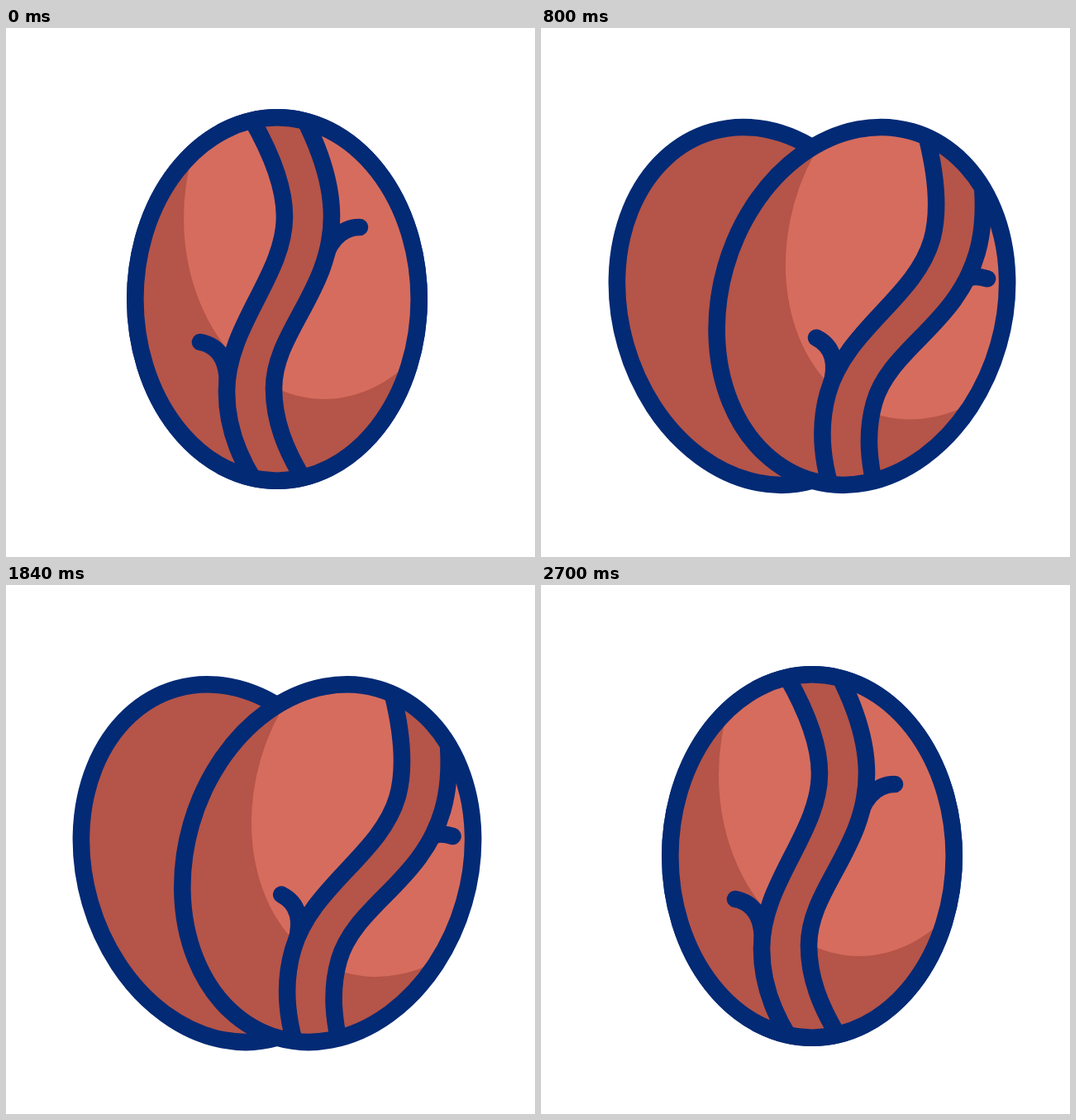
An HTML page that plays this animation: 640 px wide and 640 px high, repeating every 3.2 s.

```html
<!DOCTYPE html>
<html lang="en">
<head>
<meta charset="utf-8">
<title>Coffee bean</title>
<style>
html, body { margin: 0; width: 100%; height: 100%; overflow: hidden; background: #fff; }
svg { display: block; width: 100vw; height: 100vh; }
.line { fill: none; stroke: #032a75; stroke-width: 20.6; }
.glow { fill: none; stroke: #ffcc50; stroke-width: 22; }
.cap { stroke-linecap: round; }
.dark { fill: #b55448; }
.light { fill: #d66c5d; }
</style>
</head>
<body>
<svg viewBox="0 0 640 640">
  <defs>
    <clipPath id="shell"><ellipse cx="328" cy="328" rx="171.7" ry="219.7"/></clipPath>
  </defs>
  <g id="back">
    <ellipse class="dark" cx="328" cy="328" rx="171.7" ry="219.7"/>
    <ellipse class="line" cx="328" cy="328" rx="171.7" ry="219.7"/>
  </g>
  <g id="front">
    <g clip-path="url(#shell)">
      <ellipse class="dark" cx="328" cy="328" rx="171.7" ry="219.7"/>
      <ellipse class="light" cx="385" cy="230" rx="170" ry="219"/>
      <g id="vein">
        <path id="twigL" class="line cap"/>
        <path id="twigR" class="line cap"/>
        <path id="twigLGlow" class="glow cap" pathLength="1"/>
        <path id="twigRGlow" class="glow cap" pathLength="1"/>
        <path id="band" class="dark"/>
        <path id="stemL" class="line"/>
        <path id="stemR" class="line"/>
        <path id="stemLGlow" class="glow" pathLength="1"/>
        <path id="stemRGlow" class="glow" pathLength="1"/>
      </g>
    </g>
    <ellipse class="line" cx="328" cy="328" rx="171.7" ry="219.7"/>
  </g>
</svg>
<script>
const LOOP = 3200, OPEN = 18, REST = 14, FAR = 61, NEAR = -22;
const el = {};
document.querySelectorAll('svg [id]').forEach(n => { el[n.id] = n; });

// Cubic chains, bottom to top
const left = [[300, 547], [280, 515], [267, 480], [267, 440], [267, 360],
  [337, 300], [337, 228], [337, 190], [320, 150], [297, 110]];
const right = [[360, 546], [338, 510], [324, 475], [324, 436], [324, 368],
  [394, 318], [394, 228], [394, 178], [372, 128], [346, 82]];

const chain = pts => `${pts[0]} C${pts.slice(1).join(' ')}`;
const clamp = x => Math.min(1, Math.max(0, x));
const mix = (a, b, k) => a + (b - a) * k;
const smooth = x => x * x * (3 - 2 * x);
const ease = (t, from, to) => smooth(clamp((t - from) / (to - from)));

// Late, fast swing: cubic-bezier(.95, 0, .73, 1)
function swing(x) {
  x = clamp(x);
  let lo = 0, hi = 1;
  for (let i = 0; i < 30; i++) {
    const s = (lo + hi) / 2, r = 1 - s;
    if (3 * r * r * s * 0.95 + 3 * r * s * s * 0.73 + s * s * s < x) lo = s; else hi = s;
  }
  return smooth(lo);
}

function setPath(id, d) {
  el[id].setAttribute('d', d);
  if (el[id + 'Glow']) el[id + 'Glow'].setAttribute('d', d);
}

function trim(id, t, grow, leaveFrom, leaveTo) {
  const a = ease(t, leaveFrom, leaveTo), b = ease(t, grow, 1333);
  const node = el[id + 'Glow'];
  node.style.display = b - a > 0.001 ? '' : 'none';
  node.setAttribute('stroke-dasharray', `${b - a} 2`);
  node.setAttribute('stroke-dashoffset', -a);
}

function tilt(t) {
  if (t < 660) return OPEN * swing(t / 660);
  if (t < 1333) return mix(OPEN, REST, ease(t, 660, 935));
  if (t < 1998) return mix(REST, OPEN, ease(t, 1667, 1998));
  return OPEN * swing((2663 - t) / 665);
}

function slide(t) {
  if (t < 650) return FAR * swing(t / 650);
  if (t < 1320) return mix(FAR, NEAR, ease(t, 650, 1320));
  if (t < 1998) return mix(NEAR, FAR, ease(t, 1320, 1998));
  return FAR * swing((2663 - t) / 665);
}

function draw(t) {
  const angle = tilt(t), dx = slide(t);
  el.front.setAttribute('transform', `rotate(${angle} 328 548)`);
  el.back.setAttribute('transform', `rotate(${-angle} 328 548)`);
  el.vein.setAttribute('transform', `translate(${dx} 0)`);

  // The right twig shortens as the vein turns away
  const k = 13.5 * clamp((dx / FAR - 0.1) / 0.36);
  setPath('twigR', `M382 290 C388 262 ${403 - k} ${241 + k} ${428 - k} ${241 + k}`);

  trim('stemL', t, 967, 1333, 1720);
  trim('stemR', t, 967, 1333, 1740);
  trim('twigL', t, 1033, 1400, 1700);
  trim('twigR', t, 1033, 1400, 1700);
}

setPath('stemL', 'M' + chain(left));
setPath('stemR', 'M' + chain(right));
setPath('band', `M${chain(left)} L${chain([...right].reverse())} Z`);
setPath('twigL', 'M268 430 C268 400 256 384 235 380');

const start = performance.now();
function frame() {
  draw((performance.now() - start) % LOOP);
  requestAnimationFrame(frame);
}
frame();
</script>
</body>
</html>
```
